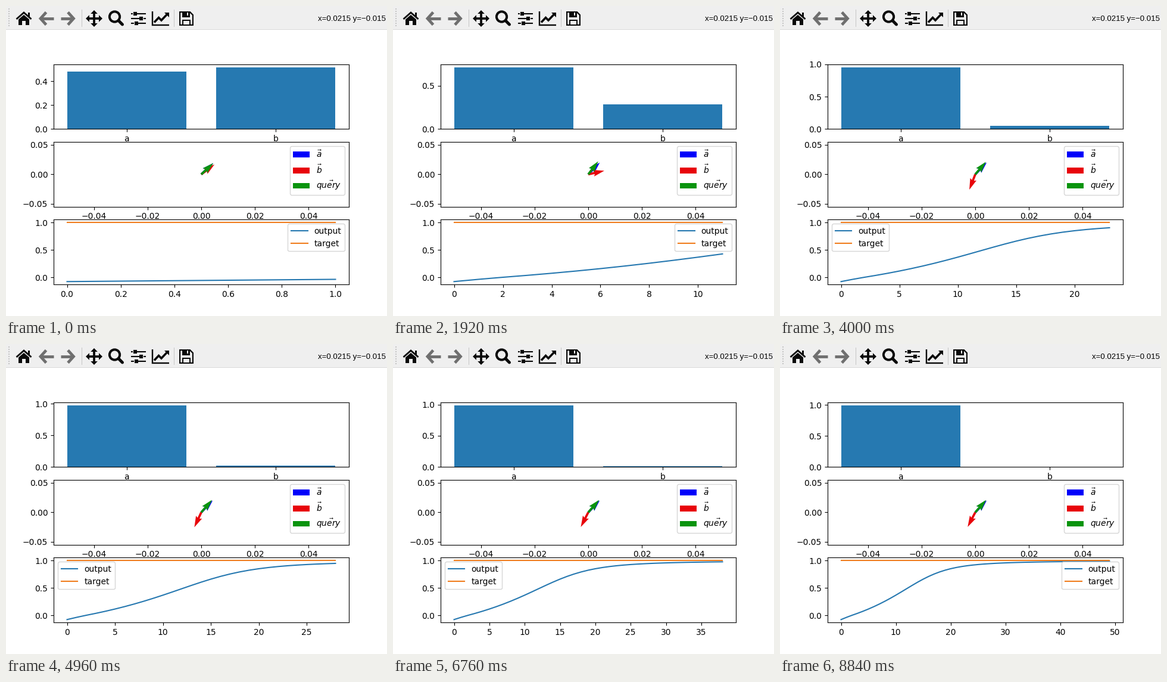
A matplotlib script for the animation above (8.88 s loop, 640 by 520 pixels).

```python
import numpy as np
import matplotlib.pyplot as plt
from matplotlib.animation import FuncAnimation
from matplotlib.patches import Circle, Patch, Polygon, Rectangle

W, H, DPI = 640, 520, 100
TICK, LOOP = 40, 8880
STEP, LEAD = 184.5, 70      # ms per training step, time already spent in the first
LAST = 49
BLUE, RED, GREEN = "#0000fa", "#e8040a", "#0a940e"
INK, GREY, PANEL = "#0a0a0a", "#6f6f6f", "#efefef"


def train():
    """Score gap of a over b after each step; learning speeds up, then saturates."""
    z = [-.15]
    for _ in range(LAST):
        g = z[-1]
        rate = .07 + .075 * abs(g) + .058 * g**2
        z.append(g + rate * (1 - np.tanh(g / 2)**2))
    return np.array(z)


steps = np.arange(LAST + 1)
gap = train()
output = np.tanh(gap / 2)

# Directions in degrees; b slides backwards along the query
angle_a = 46 - 3.5 * np.exp(-steps / 5)
angle_q = 49 + 4 * (steps - 2.75) * np.exp(-steps / 5)
angle_b = 50 - np.degrees(np.arctan2(1, 4 - 3.2 * gap + .3 * gap**2))

fig = plt.figure(figsize=(W / DPI, H / DPI), dpi=DPI, facecolor="white")


# Toolbar, in pixels from the top left
bar = fig.add_axes([0, 0, 1, 1], zorder=-1)
bar.set(xlim=(0, W), ylim=(H, 0))
bar.axis("off")


def box(x, y, w, h, color=INK):
    bar.add_patch(Rectangle((x, y), w, h, fc=color, ec="none"))


def shape(points, color=INK):
    bar.add_patch(Polygon(points, fc=color, ec="none"))


def stroke(points, width, color=INK, cap="butt"):
    x, y = zip(*points)
    bar.plot(x, y, color=color, lw=width * 72 / DPI,
             solid_capstyle=cap, solid_joinstyle="miter")


def home_icon(cx, cy):
    stroke([(cx - 12.5, cy + 1), (cx, cy - 10), (cx + 12.5, cy + 1)], 2.8)
    box(cx + 6.5, cy - 10.5, 3.6, 7)
    shape([(cx - 9, cy + 1.5), (cx, cy - 6.2), (cx + 9, cy + 1.5),
           (cx + 9, cy + 11), (cx - 9, cy + 11)])
    box(cx - 2.6, cy + 4, 5.2, 7.2, PANEL)


def arrow_icon(tip, way):
    stroke([(tip + way * 12, 10.5), (tip + way * 2.5, 21), (tip + way * 12, 31.5)],
           4.8, GREY)
    stroke([(tip + way * 3, 21), (tip + way * 24, 21)], 4.8, GREY)


def move_icon(cx, cy):
    for dx, dy in ((1, 0), (-1, 0), (0, 1), (0, -1)):
        def at(u, v):
            return cx + dx * u - dy * v, cy + dy * u + dx * v
        stroke([at(0, 0), at(9, 0)], 3.8)
        shape([at(14, 0), at(8, 5.8), at(8, -5.8)])


def zoom_icon(cx, cy):
    bar.add_patch(Circle((cx, cy), 8.6, fc="none", ec=INK, lw=4 * 72 / DPI))
    stroke([(cx + 6.5, cy + 6.5), (cx + 13, cy + 13)], 5, cap="round")


def sliders_icon(x, cy, size=25):
    for row, knob in enumerate((.29, .71, .375)):
        y, k = cy + (row - 1) * size / 3, x + knob * size
        stroke([(x, y), (x + size, y)], 2.1)
        stroke([(k - 3.6, y), (k + 3.6, y)], 6.2, PANEL)
        stroke([(k - 3.1, y), (k + 3.1, y)], 6.2)


def chart_icon(x, y):
    stroke([(x, y - 23), (x, y), (x + 28, y)], 2.4)
    stroke([(x + 3, y - 4.5), (x + 10.5, y - 12.5), (x + 15, y - 8),
            (x + 24.5, y - 18)], 3.6)
    shape([(x + 19.5, y - 21.5), (x + 27.5, y - 21.5), (x + 27.5, y - 13.5)])


def save_icon(x, y, size=24):
    for inset, color in ((0, INK), (2.2, PANEL)):
        a, b, cut = inset, size - inset, 5.5 - inset / 2
        shape([(x + a, y + a), (x + b - cut, y + a), (x + b, y + a + cut),
               (x + b, y + b), (x + a, y + b)], color)
    box(x + 5, y + 1, 12.5, 8.5)
    box(x + 12.5, y + 2.2, 2.8, 5.2, PANEL)
    box(x + 5, y + 13.5, 14, 9.5)
    box(x + 7, y + 15.6, 10, 6.2, PANEL)


box(0, 0, W, 39, PANEL)
box(0, 39, W, 1, "#dadada")
for y in range(4, 36, 4):
    box(4, y, 2, 2, "#c4c4c4")
for x in (127, 282):
    box(x, 6, 1, 29, "#c6c6c6")

home_icon(30, 21)
arrow_icon(55.5, 1)
arrow_icon(116, -1)
move_icon(148, 21)
zoom_icon(182.5, 18)
sliders_icon(209.5, 21)
chart_icon(246, 32)
save_icon(291, 9)
bar.text(524, 25, "x=0.0215 y=\u22120.015", family="Liberation Sans",
         size=9.55, color="black")

# Plots
grid = fig.add_gridspec(3, 1, left=.125, right=.9, bottom=52.8 / H,
                        top=422.4 / H, hspace=.2)
ax_w, ax_v, ax_o = (fig.add_subplot(g) for g in grid)

bars = ax_w.bar(["a", "b"], [.5, .5], color="#2679b1")

colors = (BLUE, RED, GREEN)
arrows = ax_v.quiver([0] * 3, [0] * 3, [1] * 3, [0] * 3,
                     color=colors, scale=18, width=.0075)
ax_v.set(xlim=(-.055, .055), ylim=(-.055, .055))
names = (r"$\vec{a}$", r"$\vec{b}$", r"$\vec{query}$")
ax_v.legend(handles=[Patch(fc=c, ec="none", lw=0, label=s)
                     for c, s in zip(colors, names)], loc="upper right")

out_line, = ax_o.plot([], [], color="#2678b0", label="output")
goal_line, = ax_o.plot([], [], color="#f07d1e", label="target")
margin = .05 * (1 - output[0])
ax_o.set_ylim(output[0] - margin, 1 + margin)
key = ax_o.legend(loc="upper right")


def update(frame):
    n = min(int((frame * TICK + LEAD) / STEP) + 1, LAST)

    weights = (1 + output[n]) / 2, (1 - output[n]) / 2
    for rect, w in zip(bars, weights):
        rect.set_height(w)
    ax_w.set_ylim(0, 1.05 * max(weights))

    turn = np.radians([angle_a[n], angle_b[n], angle_q[n]])
    arrows.set_UVC(np.cos(turn), np.sin(turn))

    out_line.set_data(steps[:n + 1], output[:n + 1])
    goal_line.set_data([0, n], [1, 1])
    ax_o.set_xlim(-.05 * n, 1.05 * n)
    # the key keeps clear of the curve
    key.set_loc("upper left" if 12 <= n < LAST else "upper right")
    return []


anim = FuncAnimation(fig, update, frames=LOOP // TICK, interval=TICK,
                     init_func=lambda: update(0), repeat=True, repeat_delay=0)
plt.show()
```
